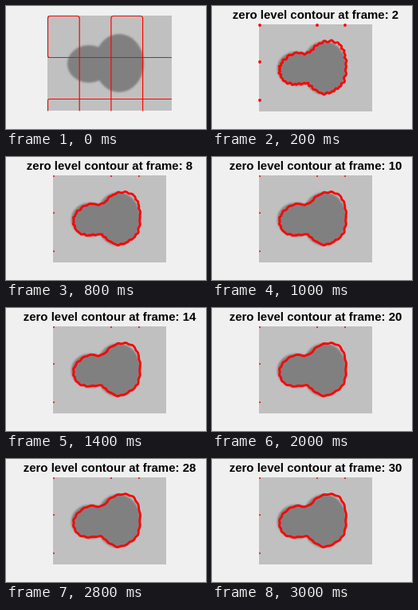
Write an HTML page that moves like this. It is 251x154 px and loops after 3.2 s.

```html
<!DOCTYPE html>
<html lang="en">
<head>
<meta charset="utf-8">
<title>Zero level contour</title>
<style>
  html, body { margin: 0; width: 100%; height: 100%; overflow: hidden; background: #f0f0f0; }
  svg { display: block; width: 251px; height: 154px; }
  text { font: bold 15px "Liberation Sans", Arial, sans-serif; text-anchor: middle; }
  .line { fill: none; stroke: #f00; stroke-linejoin: round; stroke-linecap: round; }
</style>
</head>
<body>
<svg viewBox="0 0 251 154">
  <defs>
    <filter id="soft" x="-10%" y="-10%" width="120%" height="120%" color-interpolation-filters="sRGB">
      <feGaussianBlur stdDeviation="0.9"/>
    </filter>
  </defs>
  <g id="image">
    <rect width="156" height="119" fill="#c0c0c0"/>
    <g fill="#808080" filter="url(#soft)">
      <ellipse cx="52" cy="60.5" rx="27" ry="23.5"/>
      <ellipse cx="90" cy="59.5" rx="31" ry="36.5"/>
    </g>
  </g>
  <path id="grid" class="line" stroke-width="1.2"/>
  <g id="result">
    <path id="contour" class="line" stroke-width="2.8"/>
    <path id="dots" class="line"/>
    <text id="title" x="130" y="16"></text>
  </g>
</svg>
<script>
const STEP = 200, LOOP = 3200, SAMPLES = 8;
const el = id => document.getElementById(id);

// Key points of the settled outline, clockwise from the left tip
const outline = [
  [85, 77], [91, 67], [104, 59], [120, 59], [133, 48], [147, 44], [160, 48], [167, 62], [168, 80],
  [165, 95], [156, 104], [141, 110], [128, 104], [119, 97], [104, 98], [92, 95], [86, 87]];

// Point and slope of a Catmull-Rom span
const spline = (a, b, c, d, t) => b + t / 2 * (c - a + t * (2 * a - 5 * b + 4 * c - d + t * (3 * (b - c) + d - a)));
const slope = (a, b, c, d, t) => (c - a) / 2 + t * (2 * a - 5 * b + 4 * c - d) + 1.5 * t * t * (3 * (b - c) + d - a);

// The outline with a ripple along its normal that calms down step by step
function contourAt(step) {
  const n = outline.length, pts = [];
  const fine = 0.9 * Math.exp(-(step - 1) / 4);
  for (let i = 0; i < n * SAMPLES; i++) {
    const k = Math.floor(i / SAMPLES), t = i % SAMPLES / SAMPLES;
    const near = [n - 1, 0, 1, 2].map(o => outline[(k + o) % n]);
    const along = (f, axis) => f(...near.map(p => p[axis]), t);
    const dx = along(slope, 0), dy = along(slope, 1);
    const turn = 2 * Math.PI * i / (n * SAMPLES);
    const wave = 0.5 * Math.sin(23 * turn + 1) + fine * Math.sin(37 * turn + 2 * Math.sin(5 * turn));
    const push = wave / Math.hypot(dx, dy);
    pts.push([along(spline, 0) + dy * push, along(spline, 1) - dx * push].map(v => v.toFixed(2)));
  }
  return "M" + pts.join("L") + "Z";
}

function gridPath() {
  const [left, top, right, bottom, w, h] = [52.5, 12.5, 207.5, 131, 39.7, 52];
  let d = `M${left} ${bottom}V${top + 2 * h + 2}q0 -2 2 -2H${right}`;
  d += `M${left} ${top + 3}V${top + h - 2}q0 2 2 2H${right}`;
  for (const x of [left, left + 2 * w]) {
    d += `M${x} ${x === left ? top + h - 2 : bottom}V${top + 3}q0 -3 3 -3h${w - 6}q3 0 3 3V${bottom}`;
  }
  return d;
}

function dotPath() {
  const dot = (x, y) => `M${x} ${y}h0.01`;
  return [60, 132, 167].map(x => dot(x, 24)).join("") + [70, 118].map(y => dot(60, y)).join("");
}

function draw(step) {
  const first = step === 0;
  el("image").setAttribute("transform",
    first ? "translate(52 12)" : "translate(59 23) scale(.9103 .916)");
  el("grid").style.display = first ? "" : "none";
  el("result").style.display = first ? "none" : "";
  el("title").textContent = "zero level contour at frame: " + step * 2;
  el("contour").setAttribute("d", contourAt(step));
  el("dots").setAttribute("stroke-width", step < 3 ? 3.8 : 2);
}

let shown = -1;
function tick() {
  const step = Math.floor(performance.now() % LOOP / STEP);
  if (step !== shown) draw(shown = step);
  requestAnimationFrame(tick);
}

el("grid").setAttribute("d", gridPath());
el("dots").setAttribute("d", dotPath());
tick();
</script>
</body>
</html>
```
